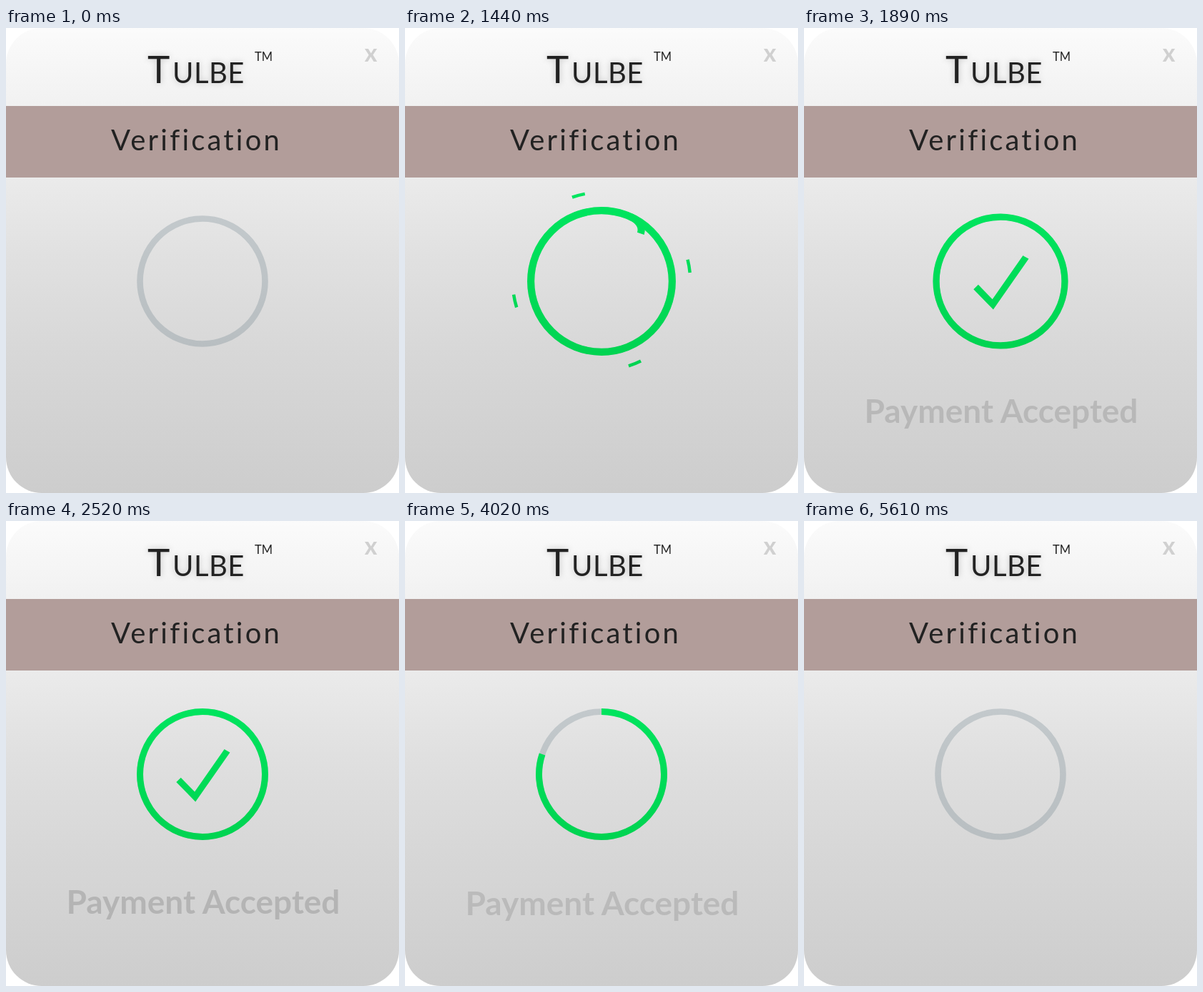
An HTML page that plays this animation: 550 px wide and 650 px high, repeating every 5.64 s.

```html
<!DOCTYPE html>
<html lang="en">
<head>
<meta charset="utf-8">
<title>Verification</title>
<style>
  html, body { margin: 0; width: 100%; height: 100%; overflow: hidden; background: #fff; }
  svg { display: block; width: 550px; height: 650px; font-family: Lato, "Open Sans", sans-serif; }
  .brand { text-shadow: 0 0 10px rgba(0, 0, 0, .22); }
  .stroke { fill: none; stroke: url(#green); stroke-width: 9; }
</style>
</head>
<body>
<svg viewBox="0 0 550 650">
  <defs>
    <linearGradient id="card" x2="0" y2="1">
      <stop offset="0" stop-color="#fbfbfb"/>
      <stop offset=".17" stop-color="#f1f1f1"/>
      <stop offset=".32" stop-color="#ebebeb"/>
      <stop offset=".5" stop-color="#e0e0e0"/>
      <stop offset=".71" stop-color="#d7d7d7"/>
      <stop offset="1" stop-color="#cdcdcd"/>
    </linearGradient>
    <linearGradient id="green" gradientUnits="userSpaceOnUse" x1="0" y1="255" x2="0" y2="450">
      <stop offset="0" stop-color="#00e55f"/>
      <stop offset="1" stop-color="#00d351"/>
    </linearGradient>
  </defs>

  <rect width="550" height="650" rx="50" fill="url(#card)"/>
  <rect y="109" width="550" height="100" fill="#b29d9a"/>

  <g fill="#222">
    <text class="brand" x="198" y="77" font-size="53">T<tspan x="233" font-size="40" letter-spacing=".5">ULBE</tspan></text>
    <text x="348" y="46" font-size="16.5">TM</text>
    <text x="147" y="171" font-size="40" letter-spacing="3.2">Verification</text>
  </g>
  <text x="502" y="46.5" font-size="25" font-weight="900" fill="#d0d0d0">X</text>

  <g id="badge">
    <circle cx="275" cy="354" r="87.5" fill="none" stroke="rgba(56,86,101,.2)" stroke-width="8.6"/>
    <path id="ring" class="stroke"/>
    <path id="check" class="stroke" d="M310.6 274C322 279 327 288 322.8 297L309.3 321.5L264.6 385.5L241.5 361.8"/>
    <path id="sparks" class="stroke" style="stroke-width:4"/>
  </g>

  <text id="label" x="84.5" y="549" font-size="46" font-weight="700" fill="rgba(0,0,0,.145)">Payment Accepted</text>
</svg>

<script>
  const LOOP = 5640, STEP = 30;
  const CX = 275, CY = 354;
  const SPARKS = [0, 77.8, 177, 264.8];
  const $ = id => document.getElementById(id);
  const badge = $('badge'), ring = $('ring'), check = $('check');
  const sparks = $('sparks'), label = $('label');

  const pathLen = check.getTotalLength();
  const restStart = pathLen - 111.5;

  const span = (t, a, b) => Math.min(1, Math.max(0, (t - a) / (b - a)));
  const easeOut = (u, power) => 1 - (1 - u) ** power;
  const sine = u => (1 - Math.cos(Math.PI * u)) / 2;
  const soft = (u, amount) => u + (sine(u) - u) * amount;

  // Angles are in degrees, clockwise from the top.
  const polar = (r, deg) => {
    const a = deg * Math.PI / 180;
    return `${CX + r * Math.sin(a)} ${CY - r * Math.cos(a)}`;
  };
  const arc = (r, from, to) =>
    `M${polar(r, from)}A${r} ${r} 0 ${to - from > 180 ? 1 : 0} 1 ${polar(r, to)}`;

  function drawRing(t) {
    const sweep = 360 * (soft(span(t, 30, 1360), .25) - soft(span(t, 3840, 4560), .5));
    let d = '';
    if (sweep > 359.9) d = arc(87.5, 0, 180) + arc(87.5, 180, 360);
    else if (sweep > .1) d = arc(87.5, 0, sweep);
    ring.setAttribute('d', d);
  }

  function drawCheck(t) {
    const end = pathLen * (soft(span(t, 1350, 1830), .25) - soft(span(t, 3300, 3840), .5));
    const tail = restStart * (sine(span(t, 1500, 1860)) - sine(span(t, 3300, 3660)));
    const start = Math.min(tail, end);
    check.style.display = end - start > .1 ? '' : 'none';
    check.style.strokeDasharray = `0 ${start} ${end - start} ${pathLen * 2}`;
  }

  function drawSparks(t) {
    const head = 16 + 84 * easeOut(span(t, 975, 1740), 1.8);
    const tail = 16 + 84 * easeOut(span(t, 1050, 1740), 1.5);
    const d = head - tail > .1 ? SPARKS.map(a => arc(110, a + tail, a + head)).join('') : '';
    sparks.setAttribute('d', d);
  }

  function drawPulse(t) {
    const k = 1 + .13 * (sine(span(t, 1110, 1440)) - easeOut(span(t, 1440, 2280), 2));
    badge.setAttribute('transform', `translate(${CX} ${CY}) scale(${k}) translate(${-CX} ${-CY})`);
  }

  function drawLabel(t) {
    const u = span(t, 1440, 2280);
    const leave = span(t, 3300, 4410) ** 3.85;
    label.setAttribute('transform', `translate(0 ${12 * (1 - easeOut(u, 2) + leave)})`);
    label.setAttribute('opacity', easeOut(u, 2.6) - leave);
  }

  const origin = performance.now();
  function draw() {
    const elapsed = (performance.now() - origin) % LOOP;
    const t = Math.floor(elapsed / STEP) * STEP;
    for (const part of [drawRing, drawCheck, drawSparks, drawPulse, drawLabel]) part(t);
    requestAnimationFrame(draw);
  }
  draw();
</script>
</body>
</html>
```
